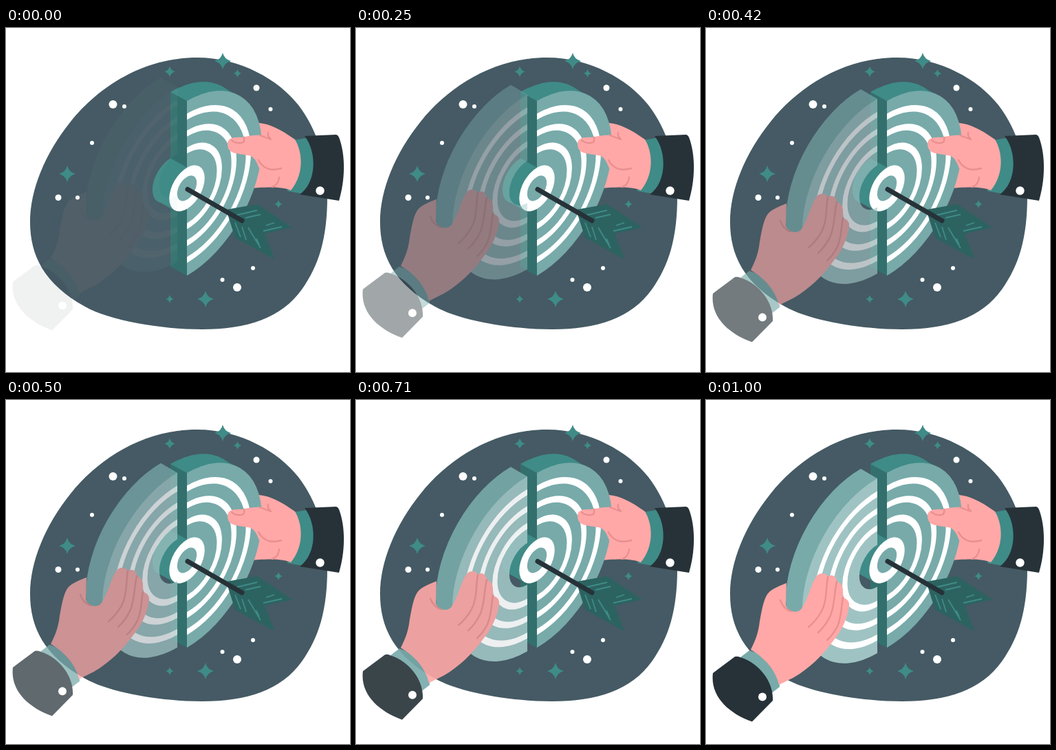
These frames come from a looping animation (500x500 px, 1.04 s). An HTML page:

```html
<!DOCTYPE html>
<html lang="en">
<head>
<meta charset="utf-8">
<title>Two halves of a target</title>
<style>
  html, body { margin: 0; height: 100%; overflow: hidden; background: #fff }
  svg { display: block; width: 100vw; height: 100vh }
  .teal { fill: #3f8b87 }
  .mid { fill: #78aaaa }
  .dark { fill: #263238 }
  .skin { fill: #ffa8a7 }
  .white { fill: #fff }
  .line { fill: none; stroke: #e98f8f; stroke-width: 2.4; stroke-linecap: round; stroke-linejoin: round }
</style>
</head>
<body>
<svg viewBox="0 0 500 500">
  <defs>
    <clipPath id="rightHalf"><rect x="0" y="-2" width="2" height="4"/></clipPath>
    <clipPath id="leftHalf"><rect x="-2" y="-2" width="2" height="4"/></clipPath>
    <path id="star" d="M0-1Q.2-.2 1 0Q.2.2 0 1Q-.2.2-1 0Q-.2-.2 0-1Z"/>
    <g id="rings" fill="none" stroke="#fff" stroke-width=".068">
      <circle r=".82"/>
      <circle r=".627"/>
      <circle r=".433"/>
    </g>
  </defs>

  <path fill="#455a64" d="M278 43C340 43 396 75 425 112C452 147 467 195 467 245C467 305 455 345 430 380C400 422 350 438 285 438C225 438 150 425 115 405C55 372 35 330 35 282C35 235 57 182 94 136C135 85 200 43 278 43Z"/>
  <g id="sky"></g>

  <!-- right arm, behind the board -->
  <path class="teal" d="M418 163L436 160L452 180V225L432 241L409 237Z"/>
  <path class="dark" d="M434 157L480 155Q483 156 484 159C494 185 493 222 484 251L427 242C452 224 452 180 434 157Z"/>
  <circle class="white" cx="456.5" cy="236.5" r="6.2"/>
  <path class="skin" d="M350 138H368C385 140 396 147 405 152L420 162C431 180 434 212 414 236C402 231 385 230 345 234Z"/>

  <!-- right half of the board -->
  <g class="teal">
    <circle r="1" transform="matrix(109 -63 0 127 239 220)" clip-path="url(#rightHalf)"/>
    <path d="M239 93L313 85L337 98L263 120Z"/>
  </g>
  <path fill="#33706d" d="M239 93L263 106V360L239 347Z"/>
  <g transform="matrix(109 -63 0 127 263 233)" clip-path="url(#rightHalf)">
    <circle class="mid" r="1"/>
    <use href="#rings"/>
  </g>
  <g class="teal">
    <circle r=".24" transform="matrix(109 -63 0 127 239 220)" clip-path="url(#leftHalf)"/>
    <path d="M239 189.5L263 202.5L245 265L221 252Z"/>
  </g>
  <g transform="matrix(109 -63 0 127 263 233)">
    <circle class="white" r=".236"/>
    <circle class="mid" r=".13"/>
  </g>

  <!-- arrow -->
  <path fill="#2c6361" d="M320 264L365 256L416 290L376 299L390 336L333 305Z"/>
  <path fill="none" stroke="#3f8b87" stroke-width="1.8" d="M335 272L365 265M348 276L370 271M378 287L390 283M374 295L401 289M333 283L341 304M343 289L349 308M352 290L370 320M364 306L368 315"/>
  <path fill="none" stroke="#263238" stroke-width="7" stroke-linecap="round" d="M264 234.5L343 280"/>

  <!-- right thumb -->
  <path class="skin" d="M322 168C322 161 330 158 342 159C352 157 362 155 372 156L400 165V205L370 206C366 203 366 192 356 186C348 184 335 183 330 181C324 179 322 174 322 168Z"/>
  <path class="line" d="M328 163C333 168 341 168 345 166Q347 163 346 159M369 156L385 162M381 152Q380 158 384 160M367 192C374 205 386 208 400 204M397 217Q396 228 387 231"/>

  <!-- left half and its hand -->
  <g id="left">
    <g class="mid">
      <path d="M225 100L249 114V130L225 140ZM151 361L175 375L185 360L160 350Z"/>
      <g transform="matrix(109 -63 0 127 225 227)" clip-path="url(#leftHalf)">
        <circle r=".8" fill="none" stroke="#78aaaa" stroke-width=".4"/>
      </g>
    </g>
    <g transform="matrix(109 -63 0 127 249 241)" clip-path="url(#leftHalf)">
      <circle r=".62" fill="none" stroke="#9fc3c3" stroke-width=".76"/>
      <use href="#rings"/>
    </g>
    <path class="mid" d="M63 364L80 370L107 405V417L94 427L50 374Z"/>
    <path class="skin" d="M65 363C73 347 76 338 78 322C82 300 85 285 92 279Q97 274 117 266L116 298C119 310 135 310 139 303C149 288 154 263 161 256C165 250 175 251 177 257C182 252 190 256 190 264C198 266 200 272 199 287C205 289 209 293 208 299C206 318 196 337 185 350C169 372 150 390 128 403L106 414C102 394 85 374 65 363Z"/>
    <path class="line" d="M108 291Q112 303 123 307M177 257C174 275 176 292 168 307Q160 321 149 330M190 264C186 283 187 298 181 313Q174 328 163 338M199 287C196 305 197 315 191 329Q184 342 176 349"/>
    <path class="dark" d="M42 373C30 382 20 389 10 397C6 430 32 455 67 467.5L97 437C99 412 79 383 50 374Q46 372 42 373Z"/>
    <circle class="white" cx="82" cy="431.5" r="6"/>
  </g>
</svg>
<script>
  const stars = [[315, 48, 12], [238, 63.5, 8], [336.5, 66, 6], [89, 212, 12], [396, 256, 6], [238, 394, 6], [290, 394, 12]];
  const dots = [[155.5, 111, 6], [172, 114, 3], [364, 87, 4.5], [384.5, 118, 3], [125, 167, 3], [76, 246.5, 4.5],
    [104, 246.5, 3], [359, 349, 3], [314.5, 366, 3], [336, 377, 6]];
  document.getElementById('sky').innerHTML =
    stars.map(([x, y, r]) => `<use href="#star" class="teal" transform="translate(${x} ${y}) scale(${r})"/>`).join('') +
    dots.map(([x, y, r]) => `<circle class="white" cx="${x}" cy="${y}" r="${r}"/>`).join('');

  const LOOP = 1040, STEPS = 25, DROP = 30;
  const left = document.getElementById('left');

  function draw(now) {
    const step = Math.min(STEPS - 1, Math.floor((now % LOOP + 4) * 24 / 1000));
    const shown = Math.sin((step + 1) / STEPS * Math.PI / 2);   // ease-out
    left.setAttribute('opacity', shown);
    left.setAttribute('transform', `translate(0 ${(shown - 1) * DROP})`);
  }

  const start = performance.now();
  function tick() {
    draw(performance.now() - start);
    requestAnimationFrame(tick);
  }
  tick();
</script>
</body>
</html>
```
